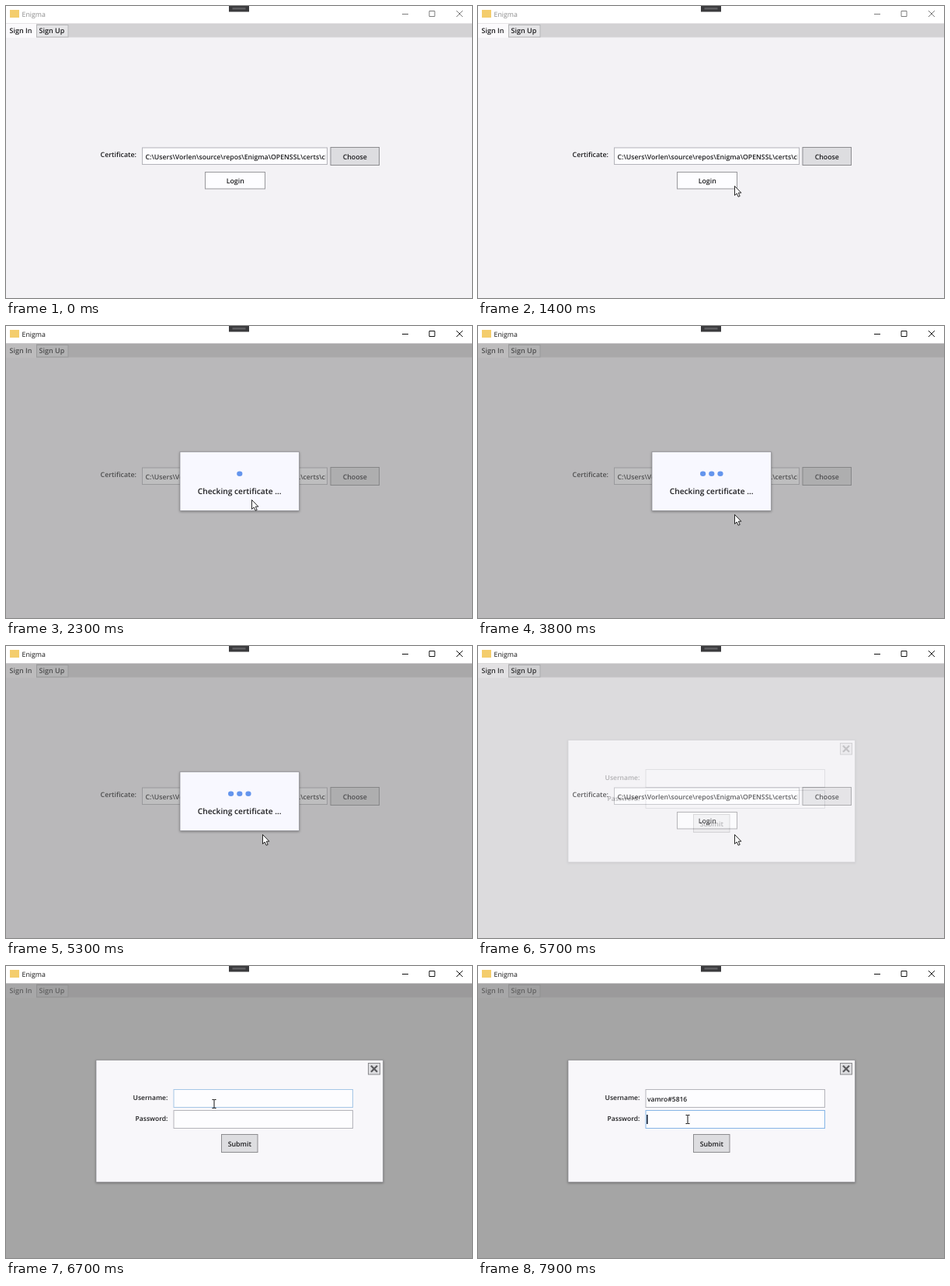
Recreate the animation shown at these times as an HTML page. Size 600 by 377 pixels, loop 8 s.

```html
<!DOCTYPE html>
<html lang="en">
<head>
<meta charset="utf-8">
<title>Sign in</title>
<style>
html, body { margin: 0; width: 100%; height: 100%; overflow: hidden; background: #f3f2f5; }
svg { display: block; width: 100%; height: 100%; }
text { font: 600 8.8px "Open Sans", "Noto Sans", sans-serif; fill: #1c1c1e; text-rendering: geometricPrecision; }
.mid { text-anchor: middle; }
.end { text-anchor: end; }
.tab { font-size: 9px; }
.label { font-size: 8.5px; }
.button { fill: #dddde0; stroke: #8c8c8f; }
.field { fill: #fdfdff; stroke: #b4b4ba; }
.shade { fill: #808080; }
.panel { stroke: #8e8e92; stroke-width: .7; filter: drop-shadow(0 1px 1.5px rgba(0, 0, 0, .35)); }
</style>
</head>
<body>
<svg viewBox="0 0 600 377">
  <defs>
    <clipPath id="pathClip"><rect x="177" y="184" width="234.5" height="20"/></clipPath>
  </defs>

  <rect width="600" height="377" fill="#f3f2f5"/>
  <rect width="600" height="22.5" fill="#fff"/>
  <rect x="5" y="5" width="12" height="10" fill="#f4cd6c"/>
  <text id="title" x="20.5" y="14" style="font-weight:400">Enigma</text>
  <path id="controls" d="M510 10.5h8M545 6.5h7v7h-7zM580 6l8 8M588 6l-8 8" fill="none"/>

  <rect y="22.5" width="600" height="18" fill="#d3d2d4"/>
  <rect y="23" width="39" height="18" fill="#fbfafc"/>
  <rect x="39.5" y="24.5" width="40.5" height="15.5" fill="#e5e5e7" stroke="#b6b6b8"/>
  <text class="tab" x="4.5" y="34.5">Sign In</text>
  <text class="tab" x="42.5" y="35.3">Sign Up</text>

  <text class="end" x="168" y="195.3">Certificate:</text>
  <rect class="field" x="175.5" y="183" width="238" height="21.5"/>
  <g clip-path="url(#pathClip)">
    <text x="179.5" y="197.5" style="font-size:8.7px">C:\Users\Vorlen\source\repos\Enigma\OPENSSL\certs\clients</text>
  </g>
  <rect class="button" x="418" y="182.5" width="62.5" height="23"/>
  <text class="mid" x="449.3" y="197.5">Choose</text>
  <rect x="256.5" y="214.5" width="77" height="21.5" fill="#fdfdff" stroke="#98989c"/>
  <text class="mid" x="295.2" y="228.8">Login</text>

  <g id="checking">
    <rect class="shade" y="22.5" width="600" height="355" opacity=".5"/>
    <rect class="panel" x="224" y="162.5" width="153.5" height="76" fill="#f8f8ff"/>
    <g id="dots" fill="#6495ed"></g>
    <text class="mid" x="300.7" y="216.5" style="font-size:10.2px">Checking certificate ...</text>
  </g>

  <g id="login">
    <rect class="shade" y="22.5" width="600" height="355" opacity=".68"/>
    <rect class="panel" x="116" y="121.5" width="369.5" height="157.5" fill="#f8f7fa"/>
    <rect class="button" x="466.5" y="125.5" width="15" height="14.5"/>
    <path d="M470 128.7l8 8M478 128.7l-8 8" stroke="#59595c" stroke-width="2.2"/>
    <text class="end label" x="208.3" y="173">Username:</text>
    <text class="end label" x="208.3" y="200">Password:</text>
    <rect id="userField" class="field" x="216" y="159.5" width="230.5" height="23"/>
    <rect id="passField" class="field" x="216" y="186.5" width="230.5" height="23"/>
    <text id="userText" class="label" x="218" y="174.6">vamro#5816</text>
    <rect id="caret" x="217" width="1.6" height="12" fill="#152238"/>
    <rect class="button" x="277.5" y="217.5" width="46.5" height="23"/>
    <text class="mid" x="300.8" y="232.5">Submit</text>
  </g>

  <g id="cursor">
    <path id="arrow" d="M.5 .5v12l2.7-2.5 1.9 4.3 2.1-.9-1.9-4.2h3.6z" fill="#fff" stroke="#111" stroke-width=".9"/>
    <path id="beam" d="M-2.5-5.5h2l.5.5.5-.5h2M0-5V5M-2.5 5.5h2L0 5l.5.5h2" fill="none" stroke="#111"/>
  </g>

  <rect x="287" width="26" height="7.5" fill="#3a3a3c"/>
  <rect x="291.5" y="2" width="17" height="2.5" fill="#5e5e61"/>
</svg>
<script>
const LOOP = 8000, STEP = 100;
const FADE = 333, DOT_FADE = 400, DOT_CYCLE = 1800;
const enterAt = 1000, activateAt = 1700, checkAt = 1800, dotsAt = 2900;
const loginAt = 5600, userAt = 6900, pasteAt = 7200, passAt = 7600;

const $ = id => document.getElementById(id);
const set = (id, name, value) => $(id).setAttribute(name, value);
const fade = (id, value) => set(id, "opacity", Number(value));
const ramp = (t, start, length) => Math.min(1, Math.max(0, (t - start) / length));
const smooth = p => p * p * (3 - 2 * p);

const entry = { x: 430, y: 190 };
const moves = [
  { start: 900, length: 500, x: 330, y: 232 },
  { start: 1400, length: 400, x: 316, y: 224 },
  { start: 3100, length: 700, x: 330, y: 243 },
  { start: 6200, length: 500, x: 268, y: 178 },
  { start: 7100, length: 300, x: 270, y: 198 },
];

function cursorAt(t) {
  return moves.reduce((from, move) => {
    const p = smooth(ramp(t, move.start, move.length));
    return { x: from.x + (move.x - from.x) * p, y: from.y + (move.y - from.y) * p };
  }, entry);
}

const dots = [-2, -1, 0, 1, 2].map(place => {
  const dot = document.createElementNS("http://www.w3.org/2000/svg", "ellipse");
  const shape = { cx: 300.8 + place * 11.2, cy: 190.7, rx: 3.6, ry: 3.2 };
  for (const name in shape) dot.setAttribute(name, shape[name]);
  $("dots").append(dot);
  return { dot, ring: Math.abs(place) };
});

// The row grows outward from its middle dot, one pair at a time.
function drawDots(t) {
  const phase = t < dotsAt ? 0 : (t - dotsAt) % DOT_CYCLE;
  for (const { dot, ring } of dots) {
    dot.setAttribute("opacity", ring ? ramp(phase, 900 * ring - 700, DOT_FADE) : 1);
  }
}

function drawLogin(t, { x, y }) {
  const over = top => t > loginAt && x > 216 && x < 446 && y > top && y < top + 23;
  const overUser = over(159.5), overPass = over(186.5), beam = overUser || overPass;
  const onUser = t >= userAt && t < passAt, onPass = t >= passAt;
  const border = (focus, hover) => focus ? "#86b5e6" : hover ? "#a5c6e6" : "";
  $("userField").style.stroke = border(onUser, overUser);
  $("passField").style.stroke = border(onPass, overPass);
  fade("userText", t >= pasteAt);
  fade("caret", onPass || (onUser && t < pasteAt));
  set("caret", "y", onPass ? 192 : 165);
  fade("arrow", !beam);
  fade("beam", beam);
}

function draw(t) {
  const active = t >= activateAt, cursor = cursorAt(t);
  $("title").style.fill = active ? "#111" : "#8a8a8a";
  set("controls", "stroke", active ? "#111" : "#7c7c7c");
  fade("checking", t > loginAt ? 0 : ramp(t, checkAt, FADE));
  fade("login", ramp(t, loginAt, FADE));
  drawDots(t);
  drawLogin(t, cursor);
  fade("cursor", t >= enterAt);
  set("cursor", "transform", `translate(${cursor.x} ${cursor.y})`);
}

const start = performance.now();
function tick() {
  const t = (performance.now() - start) % LOOP;
  draw(Math.floor(t / STEP) * STEP);
  requestAnimationFrame(tick);
}
tick();
</script>
</body>
</html>
```
